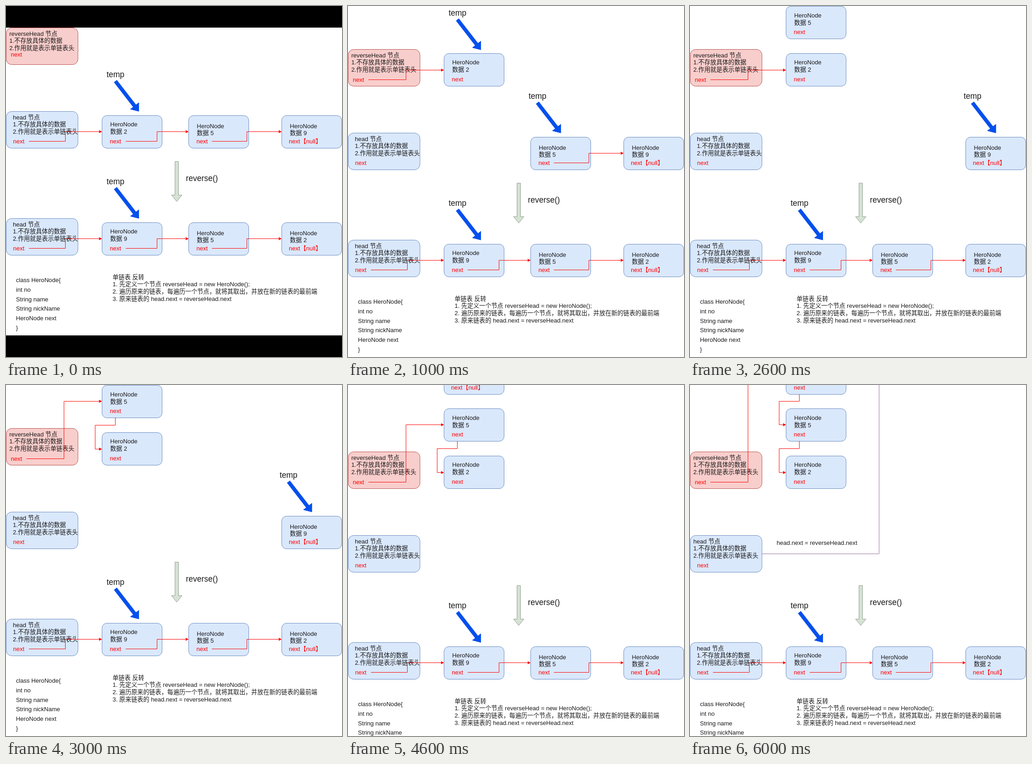
Recreate the animation shown at these times as an HTML page with a canvas. Size 733 by 764 pixels, loop 7 s.

```html
<!DOCTYPE html>
<html lang="zh-CN">
<head>
<meta charset="utf-8">
<title>单链表 反转</title>
<style>
html, body { margin: 0; height: 100%; overflow: hidden; background: #fff; }
canvas { display: block; }
</style>
</head>
<body>
<canvas id="stage" width="733" height="764"></canvas>
<script>
const ctx = document.getElementById('stage').getContext('2d');
const RED = '#ff0000';
const INK = '#1a1a1a';
const ROW = 233;
const LINK_Y = 273.5;
const BLUE_BOX = ['#dae8fc', '#6c8ebf'];
const PINK_BOX = ['#f8cecc', '#b85450'];
const HEAD_NOTES = ['1.不存放具体的数据', '2.作用就是表示单链表头'];

// y is the middle of the capitals
function text(str, x, y, color = INK, size = 13.1) {
  ctx.font = `300 ${size}px "Liberation Sans", Arial, "Noto Sans CJK SC", "Noto Sans CJK", sans-serif`;
  ctx.fillStyle = color;
  ctx.fillText(str, x, y + size * 0.35);
}

function lines(list, x, y, step = 15.7) {
  list.forEach((str, i) => text(str, x, y + i * step));
}

function box(x, y, w, h, [fill, stroke]) {
  ctx.beginPath();
  ctx.roundRect(x, y, w, h, h * 0.15);
  ctx.fillStyle = fill;
  ctx.fill();
  ctx.strokeStyle = stroke;
  ctx.stroke();
}

function polygon(points, fill, stroke) {
  ctx.beginPath();
  points.forEach(p => ctx.lineTo(...p));
  ctx.closePath();
  ctx.fillStyle = fill;
  ctx.fill();
  ctx.strokeStyle = stroke;
  ctx.stroke();
}

function polyline(points, color) {
  ctx.beginPath();
  points.forEach(p => ctx.lineTo(...p));
  ctx.strokeStyle = color;
  ctx.stroke();
}

// Connector whose last segment points right
function link(...points) {
  const [x, y] = points.pop();
  polyline([...points, [x - 5, y]], RED);
  polygon([[x - 1, y], [x - 6.5, y - 2.7], [x - 5.2, y], [x - 6.5, y + 2.7]], RED, RED);
}

function rowLink(x, bend, end, y) {
  link([x, y + 21], [bend, y + 21], [bend, y], [end, y]);
}

function blockArrow(x, y, length, angle, tail, head, headLength, fill, stroke) {
  ctx.save();
  ctx.translate(x, y);
  ctx.rotate(angle);
  const neck = length - headLength;
  polygon([[0, -tail], [neck, -tail], [neck, -head], [length, 0],
           [neck, head], [neck, tail], [0, tail]], fill, stroke);
  ctx.restore();
}

function temp(dx, dy) {
  text('temp', 219.5 + dx, 149 + dy, INK, 17.47);
  blockArrow(239 + dx, 164 + dy, 82.5, Math.atan2(65, 50.5), 3.6, 11.3, 14.5, '#0050ef', '#0046e4');
}

function headNode(y, textX = 15) {
  box(0.5, y, 156.5, 80, BLUE_BOX);
  lines(['head 节点', ...HEAD_NOTES], textX, y + 12.5);
  text('next', 15.5, y + 65, RED);
}

function node(x, y, value, textY = 19, next = 'next', nextX = 17) {
  box(x, y, 131, 71, BLUE_BOX);
  lines(['HeroNode', '数据 ' + value], x + 17.7, y + textY);
  text(next, x + nextX, y + 56, RED);
}

const nullNode = (y, value) => node(601.5, y, value, 22.5, 'next【null】', 15.5);

function reverseList(step) {
  box(0.5, 47.5, 156.5, 80, PINK_BOX);
  lines(['reverseHead 节点', ...HEAD_NOTES], 7.2, 60);
  text('next', 10.5, step ? 113 : 105, RED);
  if (!step) return;

  node(209.5, 56.5, 2);
  if (step > 1) node(209.5, -46.5, 5, 20);
  if (step > 3) node(209.5, -148.5, 9, 20, step > 4 ? 'next' : 'next【null】', step > 4 ? 17 : 15.5);

  const first = step < 3 ? 92.5 : step < 5 ? -11.5 : -113.5;
  link([44.5, 113.5], [126.5, 113.5], [126.5, first], [209.5, first]);
  if (step > 2) link([238.5, 24], [238.5, 40.5], [194.5, 40.5], [194.5, 92.5], [209.5, 92.5]);
  if (step > 4) link([238.5, -77.5], [238.5, -62.5], [194.5, -62.5], [194.5, -11.5], [209.5, -11.5]);
}

function sourceList(step) {
  headNode(229.5, step === 6 ? 7.2 : 15);
  if (step < 1) node(209.5, 238.5, 2);
  if (step < 2) node(398.5, 238.5, 5, 22.5);
  if (step < 4) nullNode(238.5, 9);
  if (step < 1) {
    rowLink(50, 129.5, 209.5, LINK_Y);
    rowLink(261, 329.5, 398.5, LINK_Y);
  }
  if (step < 2) rowLink(449, 525.5, 601.5, LINK_Y);
  if (step < 4) temp([0, 174.5, 377.5, 377.5][step], 0);
  if (step === 1) temp(0, -181);
  if (step === 6) {
    polyline([[157, 269.5], [412.5, 269.5], [412.5, -113]], '#9673a6');
    text('head.next = reverseHead.next', 189, 245.5);
  }
}

function resultList() {
  const y = 238.5 + ROW;
  headNode(229.5 + ROW);
  node(209.5, y, 9);
  node(398.5, y, 5, 22.5);
  nullNode(y, 2);
  rowLink(50, 129.5, 209.5, LINK_Y + ROW);
  rowLink(261, 329.5, 398.5, LINK_Y + ROW);
  rowLink(449, 525.5, 601.5, LINK_Y + ROW);
  temp(0, ROW);
}

function notes() {
  blockArrow(372.5, 338.5, 87, Math.PI / 2, 3.8, 11.4, 14, '#d5e2d4', '#8f9f8c');
  text('reverse()', 392.5, 374.5, INK, 17.47);
  lines(['class HeroNode{', 'int no', 'String name', 'String nickName', 'HeroNode next', '}'], 21.8, 596, 20.96);
  lines([
    '单链表 反转',
    '1. 先定义一个节点 reverseHead = new HeroNode();',
    '2. 遍历原来的链表，每遍历一个节点，就将其取出，并放在新的链表的最前端',
    '3. 原来链表的 head.next = reverseHead.next',
  ], 232.5, 590);
}

function draw(now) {
  const step = Math.floor(now / 1000) % 7;
  ctx.fillStyle = '#fff';
  ctx.fillRect(0, 0, 733, 764);
  ctx.save();
  ctx.translate(0, step === 0 ? 0 : step < 4 ? 47 : 98);
  reverseList(step);
  sourceList(step);
  resultList();
  notes();
  ctx.restore();
  if (step === 0) {
    ctx.fillStyle = '#000';
    ctx.fillRect(0, 0, 733, 47);
    ctx.fillRect(0, 717, 733, 47);
  }
}

const start = performance.now();
function tick() {
  draw(performance.now() - start);
  requestAnimationFrame(tick);
}
tick();
</script>
</body>
</html>
```
